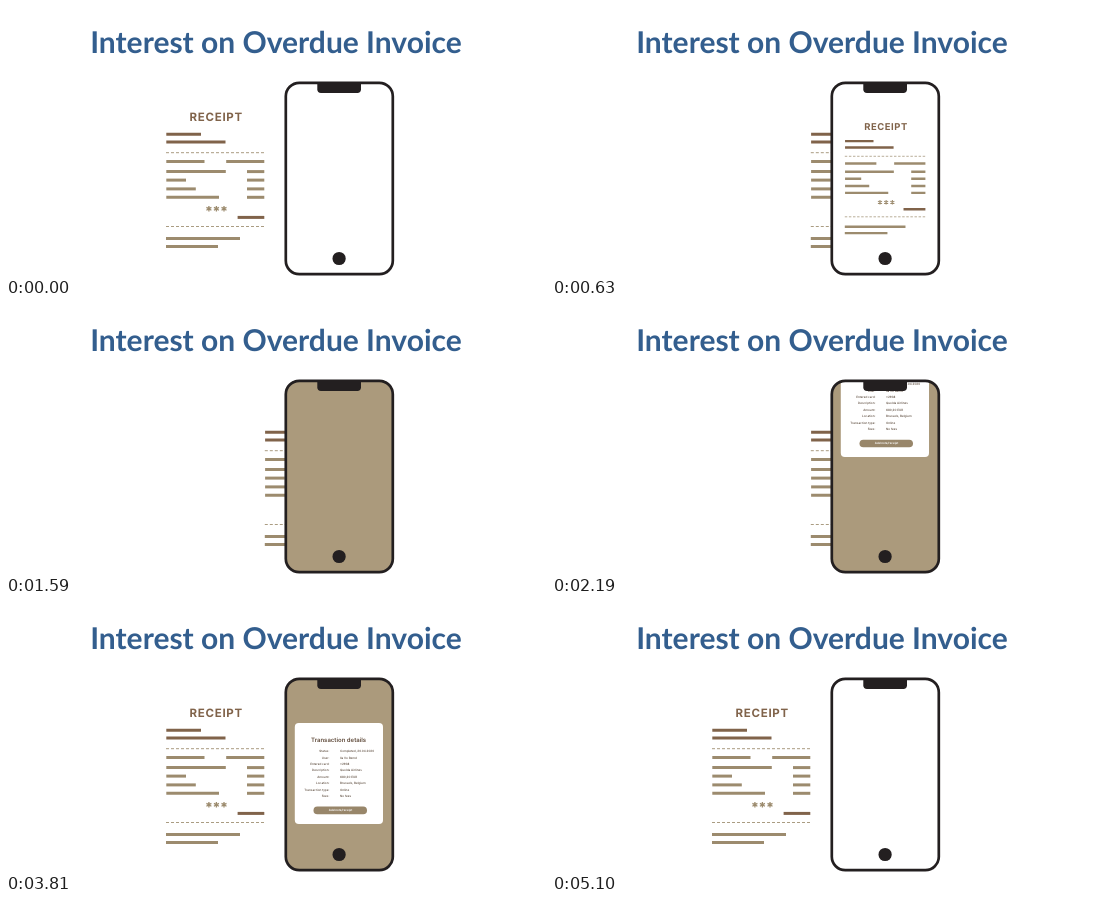
An HTML page for the animation above (5190 ms loop, 540x270 px).

```html
<!DOCTYPE html>
<html lang="en">
<head>
<meta charset="utf-8">
<title>Interest on Overdue Invoice</title>
<style>
  html, body { margin: 0; width: 100%; height: 100%; overflow: hidden; background: #fff; }
  svg { display: block; width: 540px; height: 270px; text-rendering: geometricPrecision; }
  text { font-family: Inter, "Open Sans", sans-serif; }
  .heading { font: 700 30px Lato, sans-serif; fill: #335e8e; text-anchor: middle; }
  .receipt { font-weight: 700; font-size: 11.5px; letter-spacing: .7px; fill: #80634a; }
  .bars { fill: none; stroke-width: 3; }
  .dark { stroke: #80634a; }
  .light { stroke: #9c8b6e; }
  .dash { stroke: #aa9c82; stroke-width: 1; stroke-dasharray: 3 2; }
  .star { stroke: #9c8b6e; stroke-width: 1.3; }
  .label, .value { font-size: 3px; font-weight: 500; fill: #5b4a3c; }
  .label { text-anchor: end; }
  .name { font-size: 6px; font-weight: 600; fill: #5f4a3a; text-anchor: middle; }
  .action { font-size: 2.9px; font-weight: 600; fill: #fff; text-anchor: middle; }
</style>
</head>
<body>
<svg viewBox="0 0 540 270">
  <defs>
    <clipPath id="screen"><rect x="280.5" y="77.5" width="105.5" height="190" rx="12.5"/></clipPath>
    <g id="receipt">
      <text class="receipt" x="183.6" y="115.2">RECEIPT</text>
      <g id="bars" class="bars"></g>
    </g>
  </defs>
  <text class="heading" x="270" y="46.7">Interest on Overdue Invoice</text>
  <use id="outer" href="#receipt"/>
  <rect x="279.8" y="76.8" width="107" height="191.4" rx="13.5" fill="#fff"/>
  <g clip-path="url(#screen)">
    <use id="inner" href="#receipt"/>
    <rect id="tint" x="279" y="76" width="109" height="194" fill="#ab9a7c"/>
    <g id="card">
      <rect x="288.8" y="121" width="88.2" height="101" rx="4" fill="#fff"/>
      <text class="name" x="332.6" y="139.5">Transaction details</text>
      <g id="rows"></g>
      <rect x="307.5" y="204.6" width="53.5" height="7.6" rx="3.8" fill="#98866a"/>
      <text class="action" x="334.6" y="209.4">Add note/receipt</text>
    </g>
  </g>
  <g fill="#231f20">
    <rect x="279.8" y="76.8" width="107" height="191.4" rx="13.5" fill="none" stroke="#231f20" stroke-width="2.7"/>
    <path d="M311.3 77h43.7v6.3q0 3.7-3.7 3.7h-36.3q-3.7 0-3.7-3.7z"/>
    <circle cx="333.1" cy="252.5" r="6.6"/>
  </g>
</svg>
<script>
  const LOOP = 5190;
  const $ = id => document.getElementById(id);
  const line = (cls, y, x1, x2) => `<path class="${cls}" d="M${x1} ${y}H${x2}"/>`;
  const star = x => `<path class="star" d="M${x} 200v5.6m-2.5-4.2l5 2.8m0-2.8l-5 2.8"/>`;

  $('bars').innerHTML = [
    ['dark', 128.2, 160.3, 195], ['dark', 136, 160.3, 219.5], ['dark', 211.4, 231.6, 258.3],
    ['light', 155.4, 160.3, 198.5], ['light', 155.4, 220.2, 258.3],
    ['light', 165.6, 160.3, 219.8], ['light', 174.1, 160.3, 180],
    ['light', 182.9, 160.3, 189.8], ['light', 191.3, 160.3, 213],
    ...[165.6, 174.1, 182.9, 191.3].map(y => ['light', y, 241, 258.3]),
    ['light', 232.6, 160, 234], ['light', 240.4, 160, 212],
    ['dash', 146.7, 160, 258.5], ['dash', 220.5, 160, 258.5]
  ].map(a => line(...a)).join('') + [202.9, 210.4, 218].map(star).join('');

  $('rows').innerHTML = [
    ['Status:', 'Completed, 20.04.2020'], ['User:', 'Ila Vo Remd'],
    ['Entered card:', '*2938'], ['Description:', 'Quolda Airlines'],
    ['Amount:', '680,20 EUR'], ['Location:', 'Brussels, Belgium'],
    ['Transaction type:', 'Online'], ['Fees:', 'No fees']
  ].map(([label, value], i) => {
    const y = 150.2 + i * 6.4;
    return `<text class="label" x="323.4" y="${y}">${label}</text>` +
           `<text class="value" x="334" y="${y}">${value}</text>`;
  }).join('');

  const span = (t, a, b) => Math.min(1, Math.max(0, (t - a) / (b - a)));
  const ease = (t, a, b) => (1 - Math.cos(Math.PI * span(t, a, b))) / 2;
  const move = (id, x, y) => $(id).setAttribute('transform', `translate(${x} ${y})`);
  const fade = (id, value) => $(id).setAttribute('opacity', value);

  function draw(t) {
    const enter = ease(t, 30, 630);
    move('outer', 98.8 * (enter - ease(t, 2400, 2970)), 0);

    // smaller copy sliding into the screen
    $('inner').setAttribute('transform', `translate(${161.6 - 99 * (1 - enter)} 30) scale(.82)`);
    fade('inner', t < 1590 ? 1 : 0);

    // short shutter flash, then the tinted screen
    const flash = t >= 1080 && t < 1110 ? .5 : 0;
    fade('tint', Math.max(flash, span(t, 1350, 1590) - span(t, 4860, 5100)));

    const leave = span(t, 3780, 4680) ** 2.4;
    move('card', 0, -146 * (1 - ease(t, 1870, 2490)) + 75 * leave);
    fade('card', t < 1870 ? 0 : 1 - leave);
  }

  const start = performance.now();
  function tick() {
    draw((performance.now() - start) % LOOP);
    requestAnimationFrame(tick);
  }
  tick();
</script>
</body>
</html>
```
